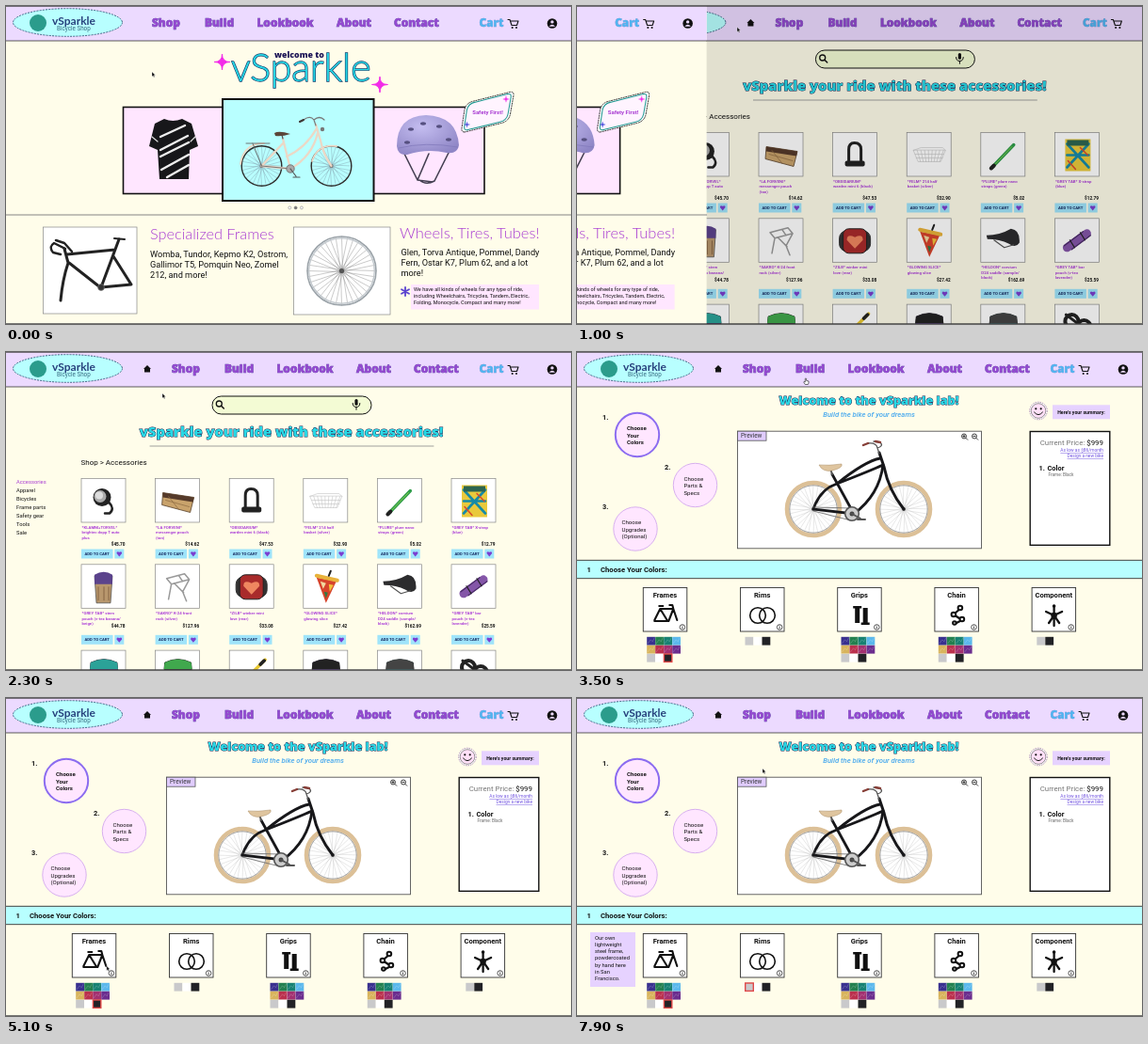
An HTML page that plays this animation: 600x338 px, repeating every 8 s.

```html
<!DOCTYPE html>
<html lang="en">
<head>
<meta charset="utf-8">
<title>Bicycle shop</title>
<style>
html, body { margin: 0; height: 100%; background: #fffdea; }
svg { display: block; width: 100vw; height: 100vh; }
text { font-family: Roboto, Arial, sans-serif; }
.b { font-weight: 700; }
.m { font-weight: 500; }
.fat { font-family: "Open Sans", sans-serif; font-weight: 800; paint-order: stroke; stroke: #182050; stroke-width: .9; }
.link { stroke: #4a3a9a; stroke-width: .6; }
.thin { font-family: Lato, sans-serif; font-weight: 300; }
.word { font-family: Lato, sans-serif; font-weight: 700; }
.mid { text-anchor: middle; }
.end { text-anchor: end; }
</style>
</head>
<body>
<svg id="stage" viewBox="0 0 600 338"></svg>
<script>
const INK = '#111', CREAM = '#fffdea', NAV = '#ecdaff', PINK = '#ffe6ff', AQUA = '#b8ffff',
  LILAC = '#e6d2ff', PURPLE = '#a83bd2', CYAN = '#27d9e6', GRAY = '#888';

// Drawing helpers, each returning markup
const text = (x, y, size, str, fill = INK, cls = '', extra = '') =>
  `<text x="${x}" y="${y}" font-size="${size}" fill="${fill}" class="${cls}" ${extra}>${str}</text>`;
const lines = (x, y, step, size, str, fill, cls) =>
  str.split('|').map((s, i) => text(x, y + i * step, size, s, fill, cls)).join('');
const rect = (x, y, w, h, fill, stroke = 'none', sw = 1, rx = 0) =>
  `<rect x="${x}" y="${y}" width="${w}" height="${h}" rx="${rx}" fill="${fill}" stroke="${stroke}" stroke-width="${sw}"/>`;
const circle = (x, y, r, fill, stroke = 'none', sw = 1, extra = '') =>
  `<circle cx="${x}" cy="${y}" r="${r}" fill="${fill}" stroke="${stroke}" stroke-width="${sw}" ${extra}/>`;
const shape = (d, fill, stroke = 'none', sw = 1, extra = '') =>
  `<path d="${d}" fill="${fill}" stroke="${stroke}" stroke-width="${sw}" stroke-linejoin="round" ${extra}/>`;
const line = (d, stroke = INK, sw = 1, extra = '') => shape(d, 'none', stroke, sw, 'stroke-linecap="round" ' + extra);
const group = (x, y, body, more = '') => `<g transform="translate(${x} ${y}) ${more}">${body}</g>`;
const star = (x, y, r, fill) =>
  shape(`M${x},${y - r}Q${x},${y} ${x + r},${y}Q${x},${y} ${x},${y + r}Q${x},${y} ${x - r},${y}Q${x},${y} ${x},${y - r}Z`, fill, fill, r / 9);
function wheel(x, y, r, n, tire, w, spoke = '#bbb') {
  let d = '';
  for (let i = 0; i < n; i++) {
    const a = i / n * 2 * Math.PI, b = a + (i % 2 ? .5 : -.5);
    d += `M${x + 2 * Math.cos(b)},${y + 2 * Math.sin(b)}L${x + r * Math.cos(a)},${y + r * Math.sin(a)}`;
  }
  return line(d, spoke, .35) + circle(x, y, r, 'none', tire, w) + circle(x, y, 2, '#666');
}

function nav(dx) {
  const links = [['Shop', 155], ['Build', 211], ['Lookbook', 266.5], ['About', 351], ['Contact', 412]];
  return rect(0, 0, 600, 37, NAV) + line('M0,37H600', '#333', .8) + line('M0,.4H600M0,337.6H600', '#444', .8) +
    `<ellipse cx="65.5" cy="17.5" rx="58" ry="14.8" fill="${AQUA}" stroke="#246" stroke-width=".8" stroke-dasharray="2 1.2"/>` +
    circle(34, 18, 9, '#2b9c8c') +
    text(49, 19.5, 12, 'vSparkle', '#27407c', 'word') + text(54, 26, 6.3, 'Bicycle Shop', '#376a80') +
    links.map(([s, x]) => text(x + dx, 22, 11.8, s, '#9448d0', 'fat link')).join('') +
    (dx ? shape('M146,18L150,14L154,18H153V21.5H147V18Z', INK) : '') +
    text(502.5, 22, 11.8, 'Cart', '#4fb4f0', 'fat', 'style="stroke:#7a86c8;stroke-width:.5"') +
    line('M533,14.5H535L537,20.5H542.5L544,16H535.6', INK, 1.1) + circle(537.7, 23, 1, INK) + circle(542, 23, 1, INK) +
    circle(580, 18.5, 5.3, INK) + circle(580, 16.9, 1.7, NAV) + shape('M576.7,21.8Q580,17.5 583.3,21.8Z', NAV);
}
const page = (id, body) => `<g id="${id}">${rect(0, 0, 600, 338, CREAM)}${body}</g>`;

function jersey() {
  return shape('M168,120Q177,124 187,120L197,125L204,149L195,153L194,184H163L161,153L152,149L158,125Z', '#17171a') +
    line('M164,139L190,127M164,153L193,138M164,160L194,145M165,174L194,158M171,182L194,169', '#eee', 2.4, 'stroke-linecap="butt"') +
    line('M155,139L161,144M201,139L196,144', '#ddd', 1.2);
}
function cityBike() {
  const c = '#ecd8c6';
  return wheel(271.5, 170, 21.3, 28, '#2e2c2b', 1.4, '#789') + wheel(345.5, 170, 21.3, 28, '#2e2c2b', 1.4, '#789') +
    line('M249,168Q252,146 274,146M325,165Q331,146 351,149', c, 1.8) +
    line('M271.5,170L302,173L294,141M271.5,170L295,145M298,160Q318,151 330,130M302,173Q325,160 331,135M329,126L334,143Q337,158 345.5,170', c, 2.3) +
    line('M271.5,170L302,173', '#777', 1) + circle(302, 173, 4.2, '#aaa', '#666', .8) +
    line('M302,173L308,181M305,182H312M294,141L293,137', '#555', 1.2) +
    shape('M285,135Q290,132 302,136Q293,139 286,138Z', '#5a4538') +
    line('M329,127L327,121Q323,116 316,121M327,121Q333,116 338,121', '#777', 1.2) + line('M316,121L312,123', '#3c3532', 2) +
    line('M255,146H280M262,146L271.5,170', '#666', .9) + circle(336, 131, 2.2, '#777');
}
function helmet() {
  return line('M422,155L437,185L449,157M470,156L455,186Q446,191 439,185M437,185L453,187', '#454052', 1.6) +
    shape('M415,149Q415,117 446,116Q479,117 481,148Q479,158 468,156Q447,151 426,158Q416,159 415,149Z', 'url(#dome)') +
    [[430, 131], [443, 125], [460, 128], [426, 145], [470, 142]].map(([x, y]) =>
      `<ellipse cx="${x}" cy="${y}" rx="3" ry="1.7" fill="#565080"/>`).join('') +
    line('M417,151Q445,144 480,150', '#827abb', .8);
}
function bareFrame() {
  return line('M65,264L116,259M67,273L100,299M120,248L101,299L133,296L114,266', '#222', 3) +
    line('M62,258L66,273Q60,291 58,313', '#222', 3) + line('M115,247L126,248', '#222', 2) +
    line('M63,258L51,252Q45,256 50,262L58,264M70,261L62,252L53,249', '#222', 2.4) + circle(101, 299, 3.4, '#333', '#777', .7);
}
function home() {
  const leaf = 'M487,134Q483.5,134 484,130L487,110Q489,102.5 497,101L535,91.5Q539.5,90.5 539,95L535.5,115Q534,122.5 526,124.5Z';
  return page('home', nav(0) +
    text(239, 80, 41, 'vSparkle', CYAN, 'thin', 'paint-order="stroke" stroke="#123a6a" stroke-width="1.3"') +
    text(285, 54.5, 8.8, 'welcome to', '#1c1456', 'fat', 'style="stroke:none"') +
    star(229.5, 59.5, 8.5, '#f32be8') + star(397, 83.5, 8.5, '#f32be8') +
    rect(124.5, 107.5, 110, 92, PINK, INK, 1.6) + rect(386, 107.5, 122, 92, PINK, INK, 1.6) + rect(230, 99, 160.5, 108, AQUA, INK, 2) +
    jersey() + cityBike() + helmet() +
    circle(301.3, 214.4, 1.5, '#fff', GRAY, .6) + circle(307.6, 214.4, 1.5, '#777', '#777', .6) + circle(313.9, 214.4, 1.5, '#fff', GRAY, .6) +
    shape(leaf, '#fff', INK, .8, 'stroke-dasharray="2 .6"') +
    group(511.5, 112.5, group(-511.5, -112.5, shape(leaf, '#fff4ff', '#239a92', 1.2)), 'scale(.9)') +
    text(511.5, 114.5, 6, 'Safety First!', PURPLE, 'b mid') + star(531, 99, 3.2, '#f32be8') + star(489.5, 126, 3, '#4c52dd') +
    line('M0,222H600', '#777', .9) +
    rect(39.5, 235, 99.5, 92, '#fff', GRAY, .7) + bareFrame() +
    text(153, 247.5, 16.3, 'Specialized Frames', PURPLE, 'thin') +
    lines(153, 266.8, 10.9, 9.2, 'Womba, Tundor, Kepmo K2, Ostrom,|Gallimor T5, Pomquin Neo, Zomel|212, and more!') +
    rect(305.5, 235, 102.5, 93, '#fff', GRAY, .7) + wheel(356.5, 281.5, 36.5, 36, '#9ba3a9', 1.6, '#666') +
    circle(356.5, 281.5, 34.8, 'none', '#c3c9ce', 1.4) + circle(356.5, 281.5, 2.6, '#555') +
    text(418, 247, 16.5, 'Wheels, Tires, Tubes!', PURPLE, 'thin') +
    lines(419.5, 265, 10.9, 9.2, 'Glen, Torva Antique, Pommel, Dandy|Fern, Ostar K7, Plum 62, and a lot|more!') +
    line('M424,299V308M420,301.2L428,305.8M428,301.2L420,305.8', '#5a42cf', 1.8) +
    rect(430, 296, 136, 26.5, PINK) +
    lines(433, 303, 6.8, 5.55, 'We have all kinds of wheels for any type of ride,|including Wheelchairs, Tricycles, Tandem, Electric,|Folding, Monocycle, Compact and many more!'));
}

// Product pictures inside a 47 px tile
const bag = (main, top) => shape('M10,13Q24,6 38,13L40,40H8Z', main, '#222', .8) + shape('M10,13Q24,6 38,13L39,20H9Z', top) +
  line('M13,25L35,35M13,35L35,25', top, 1.6);
const wires = () => {
  let d = 'M7,19L12,31H36L41,19ZM7,19L15,16H38L41,19';
  for (let x = 11; x < 40; x += 4) d += `M${x},19L${24 + (x - 24) * .72},31`;
  return line(d + 'M9,23H39M10,27H38', '#c4c4c4', .6);
};
const products = [
  ['*KLAMM+TORVEL*|brightec dopp T auto|plus', '45.70', circle(22, 20, 9.5, '#222') + circle(20, 19, 6.5, '#aaa') + circle(19, 18, 4, '#ddd') + line('M29,25Q36,32 30,37H25', '#222', 2.5)],
  ['*LA FORVENI*|messenger pouch|(tan)', '14.62', shape('M8,15L41,20L37,36L7,28Z', '#c9a36c', '#57402b', .8) + shape('M8,15L41,20L40,25L8,20Z', '#553a2a') + line('M11,23L36,30M14,19L25,33', '#8d6a42', .7)],
  ['*OBSIDARIUM*|warden mini 6 (black)', '47.53', line('M17,31V18Q17,11 23,11Q30,11 30,18V31', '#222', 3) + rect(13, 30, 21, 6, '#222', 'none', 1, 2)],
  ['*FELM* 214 half|basket (silver)', '32.90', wires()],
  ['*PLURE* plure nano|straps (green)', '5.02', line('M12,37L35,13', '#2f9d4a', 3.4) + line('M14,35L33,15', '#9bd84b', .8) + line('M11,38L14,35', '#222', 4)],
  ['*GREY TAB* X-strap|(blue)', '12.79', rect(11, 7, 27, 34, '#e9c93c') + line('M13,12L36,37M36,12L13,37M13,24H36', '#158aa8', 2.6) + rect(13, 8, 23, 6, '#2d6550') + line('M14,30L22,39M27,16L35,24', '#d9482d', 1.5)],
  ['*GREY TAB* stem|pouch (v-tex banana/|beige)', '44.78', shape('M14,12Q24,8 33,12L31,41H16Z', '#b8976d', '#444', .7) + shape('M14,11Q24,5 33,11V21H14Z', '#5b438c') + line('M18,24V38M24,24V38M29,24V38', '#866544', 1)],
  ['*SAKRO* K-24 front|rack (silver)', '127.96', line('M12,15L31,10L36,16L17,21ZM17,21L14,37M36,16L29,29L33,39M20,20L30,30M25,12L29,18', '#999', 1.5)],
  ['*ZILB* winker mini|love (rear)', '33.08', rect(7, 13, 33, 22, '#333', '#333', 1, 8) + rect(11, 11, 25, 26, '#a92b2b', '#222', 1, 6) + shape('M23.5,32L15,23Q15,16 23.5,20Q32,16 32,23Z', '#ef8760')],
  ['*GLOWING SLICE*|glowing slice', '27.42', shape('M14,14L35,18L24,41Z', '#d6432c') + line('M14,12L36,17', '#e8b23a', 4) + shape('M18,18L24,20L21,26Z', '#f2d9a0') + shape('M27,21L32,22L28,29Z', '#f2c33a') + shape('M22,29L26,30L24,36Z', '#2d7a45') + line('M27,12L29,7', '#222', 2)],
  ['*HELDON* corvium|D24 saddle (sample/|black)', '162.69', shape('M6,18Q20,18 32,11Q42,12 41,26Q37,32 30,27Q20,22 7,22Z', '#2c2c2e') + line('M14,23L25,31L35,28', '#555', 1.2)],
  ['*GREY TAB* bar|pouch (v-tex|lavender)', '25.59', line('M13,31L34,16', '#8456a8', 9) + line('M10,29L30,14M18,33L38,18', '#4b2b69', 1.3) + line('M16,23L21,31M27,15L32,23', '#222', 1.2)],
  ['', '', bag('#473089', '#2ba298')], ['', '', bag('#222', '#40a84d')],
  ['', '', line('M10,38L38,10', '#e8c72f', 3.4) + line('M11,37L15,33M33,15L37,11', '#222', 3.6)],
  ['', '', bag('#5b32a0', '#222')], ['', '', bag('#3c8b91', '#444')],
  ['', '', circle(18, 18, 7, 'none', '#222', 4) + circle(31, 24, 7, 'none', '#222', 4) + line('M12,11L37,30', '#222', 3)],
];
function product([name, price, art], i) {
  const x = 80 + i % 6 * 78.6, row = Math.floor(i / 6), y = 134.5 + row * 91.3, by = y + 75;
  const heart = shape(`M${x + 40.3},${by + 8}l-2.8,-3.4q-.2,-3 2.8,-1.4q3,-1.6 2.8,1.4z`, '#7b3fd0');
  return rect(x, y, 47, 46.5, '#fff', GRAY, .7) + group(x, y, art) + (row > 1 ? '' :
    lines(x + .5, y + 53.5, 5.4, 4.35, name, '#a126d5', 'm') + text(x + 46.5, y + (row ? 67.3 : 71.5), 4.7, '$' + price, INK, 'b end') +
    rect(x, by, 33.5, 10, '#9fe4fa') + text(x + 16.7, by + 6.6, 4.2, 'ADD TO CART', '#182c62', 'b mid') + rect(x + 35.3, by, 10, 10, '#9fe4fa') + heart);
}
function shop() {
  const side = ['Accessories', 'Apparel', 'Bicycles', 'Frame parts', 'Safety gear', 'Tools', 'Sale'];
  return page('shop', products.map(product).join('') + nav(21) +
    rect(219, 47, 169, 19, '#f3fbd4', INK, 1, 9.5) +
    circle(226.3, 55, 3, 'none', INK, 1.3) + line('M228.5,57.2L231.3,60', INK, 1.5) +
    rect(370.4, 50, 3.2, 6.8, INK, 'none', 1, 1.6) + line('M368.2,54.5Q368.2,58.5 372,58.5Q375.8,58.5 375.8,54.5M372,58.5V61.3', INK, 1) +
    text(303, 89.5, 14.8, 'vSparkle your ride with these accessories!', CYAN, 'fat mid') +
    line('M153,100H454', GRAY, .8) + text(79.5, 120, 8, 'Shop &gt; Accessories') +
    side.map((s, i) => text(11, 139.5 + i * 9.1, 5.8, s, i ? INK : PURPLE)).join('') +
    `<rect id="shade" width="600" height="338"/>`);
}

function cruiser() {
  const tire = '#dcc097';
  return wheel(251, 167, 28, 32, tire, 4.6) + wheel(347, 167, 28, 32, tire, 4.6) +
    circle(251, 167, 25.2, 'none', '#666', .6) + circle(347, 167, 25.2, 'none', '#666', .6) +
    line('M251,167L294,172L271,130M251,167Q258,146 276,140Q306,116 322,113M276,140Q312,126 325,120M325,120Q321,152 294,172', '#17171a', 2.8) +
    line('M321,107L326,122Q331,147 347,167', '#17171a', 3) + line('M251,165L291,166M251,169L291,179', '#666', .8) +
    circle(292, 172, 7.3, '#ccc', '#555', 1.6) + circle(292, 172, 2.5, '#444') +
    line('M292,172L301,177M298,178H306M271,130L269,124', '#555', 2) +
    shape('M257,120Q267,121 281,119Q283,123 271,126Q261,128 257,120Z', '#dfc59f', '#a98c64', .5) +
    line('M321,108L319,102Q318,96 309,97M319,102Q326,100 322,96L315,95', '#555', 1.3) + line('M309,97L304,99M322,96L317,95', '#873f38', 2.4);
}
const lens = (x, sign) => circle(x, 89.5, 2.5, 'none', INK, .8) + line(`M${x + 1.9},91.4L${x + 3.8},93.3M${x - 1.2},89.5h2.4${sign ? `M${x},88.3v2.4` : ''}`, INK, .8);
const icons = {
  Frames: line('M12,35L18,23H32L27,36H12M18,23L26,36M17,20H21M32,23L31,19H28M32,23L36,35', INK, 2.1),
  Rims: circle(18.5, 30, 8.3, 'none', INK, 1.6) + circle(28.5, 30, 8.3, 'none', INK, 1.6),
  Grips: rect(18.5, 20, 5, 18, INK) + rect(16.5, 20, 9, 2.5, INK) + rect(27, 22, 5, 18, INK) + rect(25, 37.5, 9, 2.5, INK),
  Chain: line('M28,22L20,29L29,35L21,39', INK, 2.2) + circle(27, 22, 2.3, '#fff', INK, 2) + circle(20, 29, 2.3, '#fff', INK, 2) + circle(29, 34, 2.3, '#fff', INK, 2) + circle(21, 38, 1.8, '#fff', INK, 2),
  Component: line('M23.5,30V20M23.5,30L15,26M23.5,30L32,26M23.5,30L18,38M23.5,30L29,38M23.5,30V41', INK, 2.3) + circle(23.5, 30, 3.3, INK) + circle(23.5, 20, 1.8, INK),
};
const palette = ['#39308f', '#23804f', '#178172', '#5bb8ec', '#d8b45c', '#bb304d', '#a33070', '#6b2d8e', '#c9c9cb', '#fff', '#222226'];
const neutral = palette.slice(8);
const swatches = (x, colors) => colors.map((c, i) => {
  const sx = x + i % 4 * 9, sy = 302.8 + Math.floor(i / 4) * 9;
  return rect(sx, sy, 8.8, 8.8, c) + (i < 8 && colors.length > 4 ? line(`M${sx + 1},${sy + 7}l3,-4l2,2l2,-4`, '#fff', .6, 'opacity=".3"') : '');
}).join('');
function card(name, i) {
  const x = 70.3 + i * 103.2;
  return rect(x, 250.5, 46.5, 46.5, '#fff', '#333', .9) + text(x + 23.2, 261, 7.6, name, INK, 'b mid') + group(x, 250, icons[name]) +
    circle(x + 41.6, 292.5, 2.8, '#fff', INK, .7) + line(`M${x + 41.6},292.3v1.6M${x + 41.6},291v.1`, INK, .7);
}
const step = (n, nx, ny, x, y, tx, str, on) => text(nx, ny, 7.4, n + '.', INK, 'b') +
  circle(x, y, 23.2, PINK, on ? '#8b6cf0' : '#d3a9ee', on ? 2 : .9) + lines(tx, y - 5, 7.5, 6.1, str, INK, on ? 'b' : '');
function build() {
  return page('build', nav(21) +
    text(310, 56, 12.7, 'Welcome to the vSparkle lab!', CYAN, 'fat mid') +
    text(310, 68.5, 7.7, 'Build the bike of your dreams', '#48a9ee', 'm mid', 'font-style="italic"') +
    step(1, 27, 71.5, 64, 88, 53, 'Choose|Your|Colors', true) + step(2, 93, 124.5, 125.5, 141.5, 113.5, 'Choose|Parts &amp;|Specs') +
    step(3, 27, 167, 62, 188, 47.5, 'Choose|Upgrades|(Optional)') +
    rect(170.5, 84.2, 259, 124.6, '#fff', '#555', .9) + rect(170.5, 84.2, 30.5, 10, '#e0ccff', '#555', .8) +
    text(174, 91.3, 6.4, 'Preview', '#333') + lens(411, true) + lens(422, false) + cruiser() +
    circle(490, 62.5, 9.3, '#fff', '#7b4b91', .6, 'stroke-dasharray="1.5 1"') + circle(490, 62.5, 7.8, '#ffe0f8', '#555', .6) +
    circle(487.3, 60.3, 1.1, INK) + circle(492.7, 60.3, 1.1, INK) + line('M485.5,64Q490,69.5 494.5,64', INK, 1) +
    rect(505, 56.3, 61, 15, LILAC) + text(535.5, 65.6, 5.2, "Here's your summary:", INK, 'b mid') +
    rect(481.2, 84.5, 84.6, 120.8, '#fff', INK, 1.4) +
    text(559, 99, 7.9, '<tspan fill="#777">Current Price:</tspan> $999', INK, 'end') +
    text(559, 106, 4.8, 'As low as $86/month', '#7052e0', 'end', 'text-decoration="underline"') +
    text(559, 112, 4.8, 'Design a new bike', '#7052e0', 'end', 'text-decoration="underline"') +
    text(490.5, 125.5, 7.4, '1.', INK, 'b') + text(499.5, 125.5, 7.4, 'Color', INK, 'b') + text(500.5, 131.5, 4.7, 'Frame: Black', '#666') +
    rect(-2, 221.3, 604, 19.4, AQUA, '#333', .9) + text(10.5, 234, 7.7, '1', INK, 'b') + text(25, 234, 7.7, 'Choose Your Colors:', INK, 'b') +
    Object.keys(icons).map(card).join('') +
    swatches(74.2, palette) + swatches(280.5, palette) + swatches(383.8, palette) + swatches(178.5, neutral) +
    swatches(488.3, [neutral[0], neutral[2]]) +
    rect(92.4, 321, 8.4, 8.4, 'none', '#e04848', 1.4) +
    `<g id="rim">${rect(178.7, 303, 8.6, 8.4, 'none', '#e04848', 1.4)}</g>` +
    `<g id="tip">${rect(14, 249, 48, 58, LILAC)}${lines(19, 257, 7.15, 5.8, 'Our own|lightweight|steel frame,|powdercoated|by hand here|in San|Francisco.')}</g>`);
}

const stage = document.getElementById('stage');
stage.innerHTML = '<defs><radialGradient id="dome" cx=".4" cy=".3" r=".75"><stop stop-color="#c4bdf0"/><stop offset="1" stop-color="#8f86c6"/></radialGradient></defs>' +
  shop() + home() + build() + '<g id="pointer">' +
  `<g id="arrow">${shape('M0,0V5L1.2,4L2,5.7L2.9,5.3L2.1,3.6H3.6Z', INK, '#fff', .3)}</g>` +
  `<g id="hand">${shape('M-.7,.3Q0,-.6 .6,.3V2.4L3,3V5L2.3,6.5H-.7L-2.3,4L-1.7,3.3L-.7,4Z', '#fff', INK, .6)}</g></g>`;

const el = id => document.getElementById(id);
const show = (id, on) => el(id).setAttribute('display', on ? 'inline' : 'none');
const move = (id, x, y) => el(id).setAttribute('transform', `translate(${x} ${y})`);
const clamp = v => Math.min(1, Math.max(0, v));

// cubic-bezier(0, 0, .58, 1), solved by bisection
function easeOut(x) {
  let lo = 0, hi = 1;
  for (let i = 0; i < 24; i++) {
    const s = (lo + hi) / 2;
    if (1.74 * s * s * (1 - s) + s ** 3 < x) lo = s; else hi = s;
  }
  return lo * lo * (3 - 2 * lo);
}

const path = [[0, 155, 70], [500, 170, 22.5], [1400, 170, 22.5], [2300, 166, 44], [3100, 243, 28], [3650, 243, 28],
  [5000, 106, 283.5], [5400, 111, 291], [5800, 111, 291], [6500, 183, 306], [6900, 183, 306], [7700, 197, 75], [8000, 197, 75]];
function pointerAt(t) {
  const i = path.findIndex(k => k[0] > t), [t0, x0, y0] = path[i - 1], [t1, x1, y1] = path[i];
  const u = (t - t0) / (t1 - t0), e = u * u * (3 - 2 * u);
  return [x0 + (x1 - x0) * e, y0 + (y1 - y0) * e];
}

function draw(t) {
  const p = easeOut(clamp((t - 697) / 520)), lab = t >= 3300, hand = t > 3000 && t < 3750;
  show('home', p < .999);
  show('shop', p > 0 && !lab);
  show('build', lab);
  move('home', -600 * p, 0);
  move('shop', 150 * (1 - p), 0);
  el('shade').setAttribute('opacity', .5 * (1 - p));
  show('tip', t >= 5500);
  show('rim', t >= 6600);
  show('hand', hand);
  show('arrow', !hand);
  move('pointer', ...pointerAt(t));
}
const start = performance.now();
(function tick() {
  draw((performance.now() - start) % 8000);
  requestAnimationFrame(tick);
})();
</script>
</body>
</html>
```
